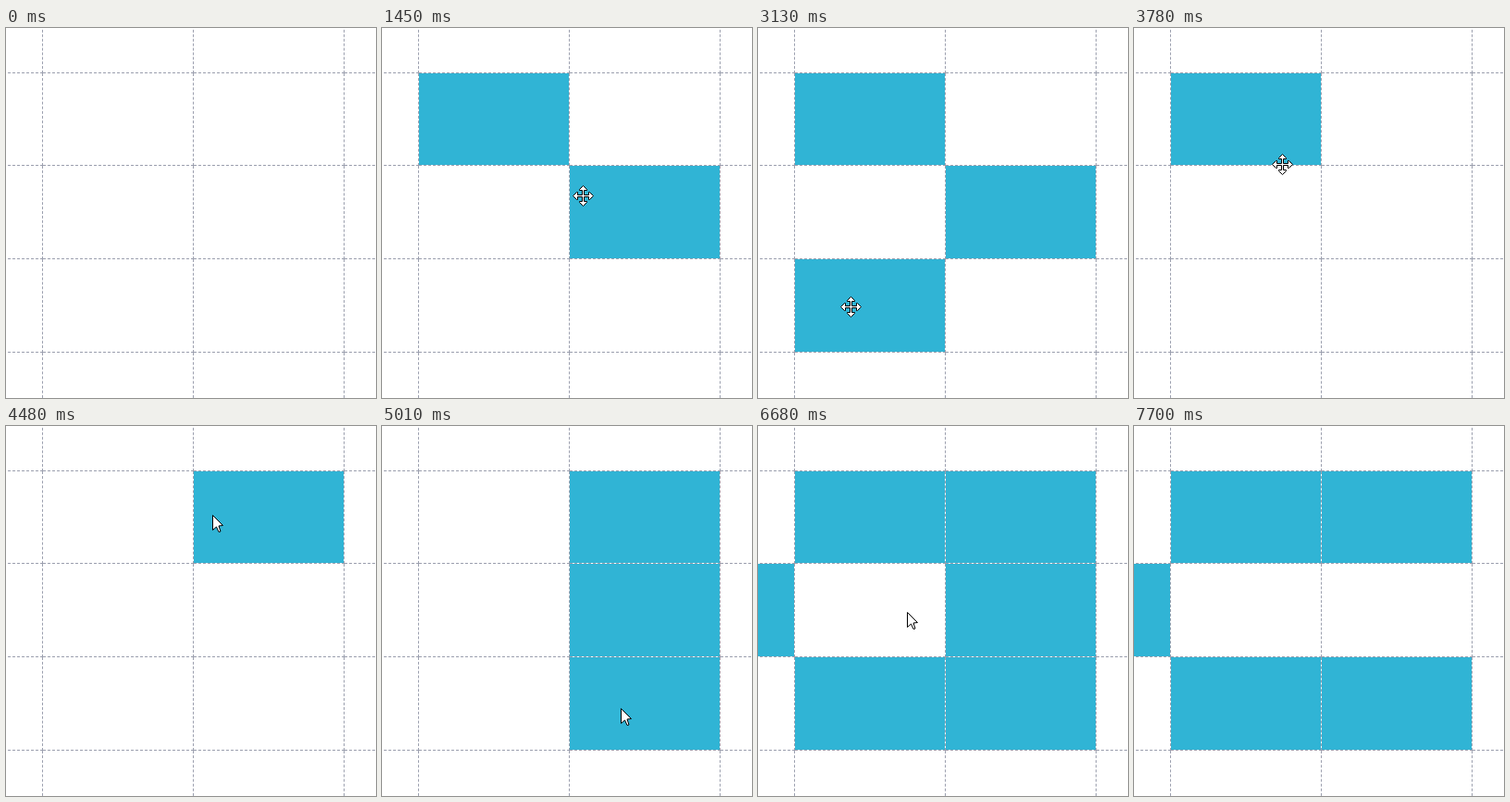
Write an HTML page with a canvas that moves like this. It is 400 by 400 pixels and loops after 8.15 s.

```html
<!DOCTYPE html>
<html lang="en">
<head>
<meta charset="utf-8">
<title>Grid painting</title>
<style>
  html, body { margin: 0; width: 100%; height: 100%; overflow: hidden; background: #fff; }
  canvas { display: block; width: 400px; height: 400px; }
</style>
</head>
<body>
<canvas id="stage" width="400" height="400"></canvas>
<script>
const ctx = document.getElementById('stage').getContext('2d');
const LOOP = 8150;
const STEP = 112;
const HIDE = 7700;
const BLUE = '#30b4d5';
const GRAY = '#9b9fae';

const colEdge = c => 39 + 163 * c;
const rowEdge = r => Math.floor(48 + 302 * r / 3);
const cellAt = (x, y) => Math.floor((x - 40) / 163) + ',' + Math.floor((y - 48) * 3 / 302);

// Pointer strokes: start, end and the points passed, from where the last one stopped.
const strokes = [
  [100, 650, [92, 67]],
  [870, 1310, [217, 181]],
  [1450, 2120, [100, 340], [108, 228]],
  [2440, 3220, [100, 303]],
  [3340, 3900, [250, 207], [117, 119]],
  [4130, 4350, [223, 96]],
  [4480, 4910, [258, 305]],
  [5010, 5460, [120, 290], [108, 86]],
  [6010, 6340, [24, 201]],
  [6460, 6680, [161, 201]],
  [6680, 6900, [280, 201]],
  [7140, 7590, [193, 362]]
];
const clicks = [870, 1450, 1780, 3220, 3560, 4130];
const drags = [[4480, 5460], [6460, 6900]];

const easeOut = u => u * (2 - u);

function along(points, u) {
  const f = u * (points.length - 1);
  const i = Math.min(Math.floor(f), points.length - 2);
  return [0, 1].map(k => Math.round(points[i][k] + (points[i + 1][k] - points[i][k]) * (f - i)));
}

// Plays the strokes once; a click or drag flips each cell it reaches.
function record() {
  const poses = [{ t: 0, cells: new Set() }];
  const cells = new Set();
  let from = [315, 388], held = null;
  for (const [start, end, ...points] of strokes) {
    const count = Math.round((end - start) / STEP);
    for (let i = 0; i <= count; i++) {
      const t = start + (end - start) * i / count;
      const [x, y] = along([from, ...points], easeOut(i / count));
      const cell = cellAt(x, y);
      const dragging = drags.some(([a, b]) => t >= a && t < b);
      const clicked = clicks.some(c => t >= c && t < c + 100);
      if (clicked || dragging && cell !== held) {
        if (!cells.delete(cell)) cells.add(cell);
      }
      held = dragging ? cell : null;
      const shape = !dragging && cells.has(cell) ? drawMove : drawArrow;
      poses.push({ t, x, y, shape, cells: new Set(cells) });
    }
    from = points[points.length - 1];
  }
  poses.push({ t: HIDE, cells });
  return poses;
}

// Spreads three-pixel dashes so that one starts and one ends the line.
function fitGap(length) {
  const few = Math.floor((length + 2) / 5);
  const gap = n => (length - 3 * n) / (n - 1);
  return Math.abs(gap(few) - 2) < Math.abs(gap(few + 1) - 2) ? gap(few) : gap(few + 1);
}

function dash(x0, y0, x1, y1) {
  ctx.setLineDash([3, fitGap(x1 - x0 + y1 - y0)]);
  ctx.beginPath();
  ctx.moveTo(x0, y0);
  ctx.lineTo(x1, y1);
  ctx.stroke();
}

function drawGrid() {
  ctx.strokeStyle = GRAY;
  ctx.lineWidth = 1;
  for (let c = -1; c < 3; c++) {
    for (let r = -1; r < 4; r++) {
      const right = colEdge(c + 1), bottom = rowEdge(r + 1);
      dash(colEdge(c) + 1, bottom + 0.5, right + 1, bottom + 0.5);
      dash(right + 0.5, rowEdge(r) + 1, right + 0.5, bottom + 1);
    }
  }
  ctx.setLineDash([]);
}

function drawCell(key) {
  const [c, r] = key.split(',').map(Number);
  const x = colEdge(c) + 1, y = rowEdge(r) + 1;
  ctx.fillRect(x, y, colEdge(c + 1) - x, rowEdge(r + 1) - y);
}

function outline(points, x, y) {
  ctx.beginPath();
  for (const [px, py] of points) ctx.lineTo(x + px + 0.5, y + py + 0.5);
  ctx.closePath();
  ctx.fillStyle = '#fff';
  ctx.fill();
  ctx.strokeStyle = '#000';
  ctx.lineWidth = 1;
  ctx.stroke();
}

const ARROW = [[0, 0], [0, 16], [4, 12.5], [6.5, 18], [8.5, 17.5], [6.5, 11.5], [11, 11]];
const ARM = [[-1, -1], [-1, -6], [-4, -6], [-4, -7], [0, -11], [4, -7], [4, -6], [1, -6]];
const turn = ([x, y], n) => n ? turn([-y, x], n - 1) : [x, y];
const MOVE = [0, 1, 2, 3].flatMap(n => ARM.map(p => turn(p, n)));

function drawArrow(x, y) { outline(ARROW, x, y); }
function drawMove(x, y) { outline(MOVE, x, y); }

const poses = record();

function draw(time) {
  const { x, y, shape, cells } = poses.filter(p => p.t <= time).pop();
  ctx.fillStyle = '#fff';
  ctx.fillRect(0, 0, 400, 400);
  drawGrid();
  ctx.fillStyle = BLUE;
  cells.forEach(drawCell);
  if (shape) shape(x, y);
}

const begin = performance.now();
function tick() {
  draw((performance.now() - begin) % LOOP);
  requestAnimationFrame(tick);
}
tick();
</script>
</body>
</html>
```
